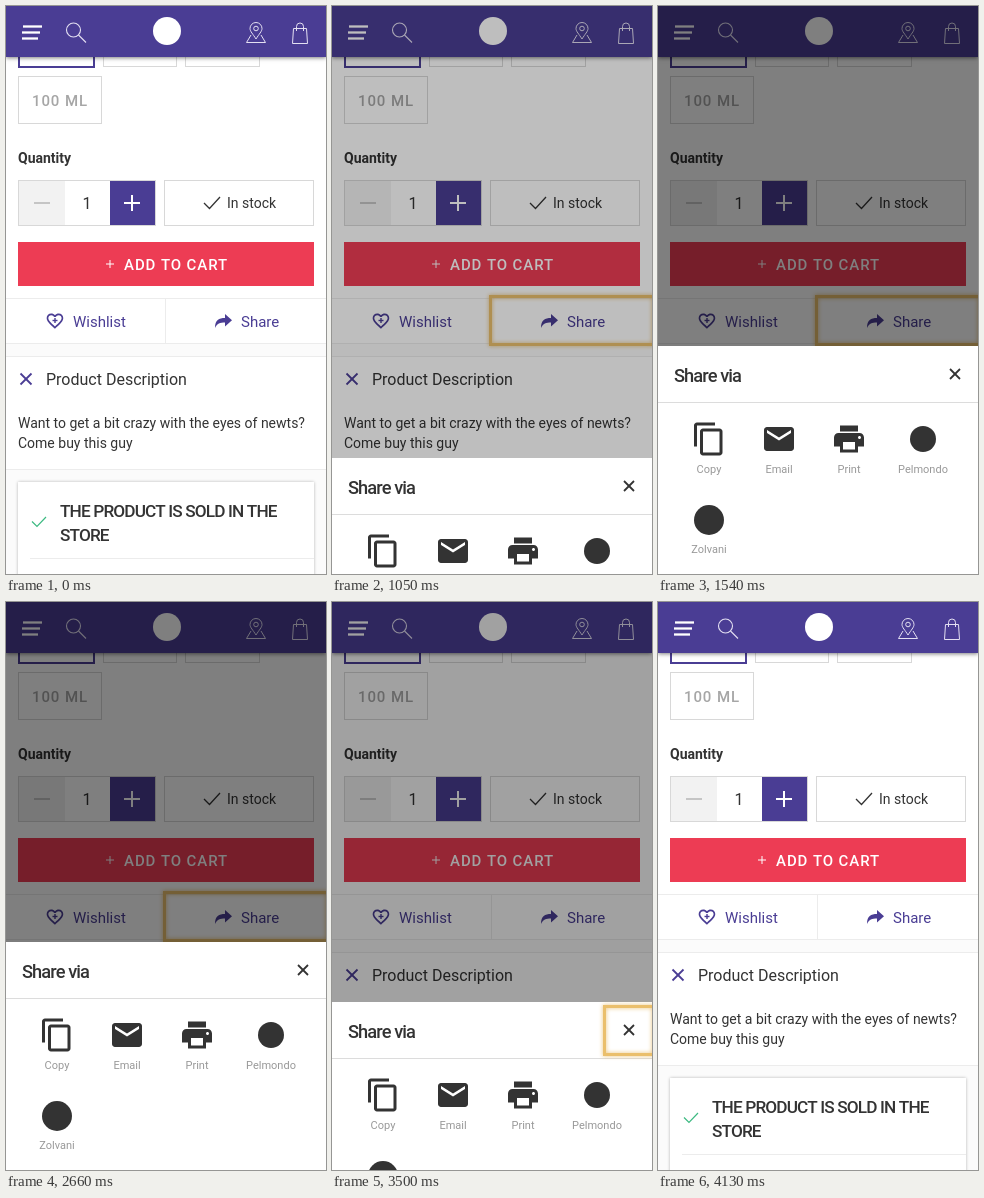
Write an HTML page with a canvas that moves like this. It is 320 by 568 pixels and loops after 4200 ms.

```html
<!DOCTYPE html>
<html lang="en">
<head>
<meta charset="utf-8">
<title>Share sheet</title>
<style>
html, body { margin: 0; width: 100%; height: 100%; overflow: hidden; background: #fff; }
canvas { display: block; width: 320px; height: 568px; }
</style>
</head>
<body>
<canvas id="stage"></canvas>
<script>
const W = 320, H = 568, LOOP = 4200, STEP = 70;
const SHEET_H = 228, SLIDE = 450, OPEN = 963, CLOSE = 3447, SHADE = .5;
const FOCUS_SHARE = 980, FOCUS_CLOSE = 3430;
const PURPLE = '#4a3d94', RED = '#ed3c54', INK = '#333', EDGE = '#d8d8d8', RULE = '#ececec';
const SANS = 'Roboto, "Open Sans", sans-serif';
const HEADING_FONTS = ['Roboto', '"Open Sans"', '"Noto Sans"'];

const canvas = document.getElementById('stage');
const ctx = canvas.getContext('2d');
const dpr = window.devicePixelRatio || 1;
canvas.width = W * dpr;
canvas.height = H * dpr;

const icons = {
  copy: new Path2D('M16 1H4c-1.1 0-2 .9-2 2v14h2V3h12V1zm3 4H8c-1.1 0-2 .9-2 2v14c0 1.1.9 2 2 2h11c1.1 0 2-.9 2-2V7c0-1.1-.9-2-2-2zm0 16H8V7h11v14z'),
  mail: new Path2D('M20 4H4c-1.1 0-2 .9-2 2v12c0 1.1.9 2 2 2h16c1.1 0 2-.9 2-2V6c0-1.1-.9-2-2-2zm0 4l-8 5-8-5V6l8 5 8-5v2z'),
  print: new Path2D('M19 8H5c-1.66 0-3 1.34-3 3v6h4v4h12v-4h4v-6c0-1.66-1.34-3-3-3zm-3 11H8v-5h8v5zm3-7c-.55 0-1-.45-1-1s.45-1 1-1 1 .45 1 1-.45 1-1 1zm-1-9H6v4h12V3z'),
  share: new Path2D('M0 14C0 6 4 4 10 4V0l7 6.300-7 6.300V8.500C5 8.500 2 9.500 0 14z'),
  heart: new Path2D('M16.5 3c-1.74 0-3.41.81-4.5 2.09C10.91 3.81 9.24 3 7.5 3 4.42 3 2 5.42 2 8.5c0 3.78 3.4 6.86 8.55 11.54L12 21.35l1.45-1.32C18.6 15.36 22 12.28 22 8.5 22 5.42 19.58 3 16.5 3zM12 18.650C7.140 14.240 4 11.390 4 8.500 4 6.500 5.500 5 7.500 5c1.540 0 3.040.990 3.570 2.360h1.870C13.460 5.990 14.960 5 16.500 5c2 0 3.500 1.500 3.500 3.500 0 2.890-3.140 5.740-8 10.150z')
};

const clamp = v => Math.max(0, Math.min(1, v));

// cubic-bezier(.36, .66, .04, 1)
function ease(x) {
  if (x <= 0 || x >= 1) return clamp(x);
  const at = (s, a, b) => 3 * (1 - s) * (1 - s) * s * a + 3 * (1 - s) * s * s * b + s * s * s;
  let lo = 0, hi = 1;
  for (let i = 0; i < 30; i++) {
    const mid = (lo + hi) / 2;
    if (at(mid, .36, .04) < x) lo = mid; else hi = mid;
  }
  return at(lo, .66, 1);
}

function rect(x, y, w, h, color) {
  ctx.fillStyle = color;
  ctx.fillRect(x, y, w, h);
}

function box(x, y, w, h, color, line = 1) {
  ctx.strokeStyle = color;
  ctx.lineWidth = line;
  ctx.strokeRect(x + line / 2, y + line / 2, w - line, h - line);
}

function disc(x, y, r, color) {
  ctx.fillStyle = color;
  ctx.beginPath();
  ctx.arc(x, y, r, 0, Math.PI * 2);
  ctx.fill();
}

function ring(x, y, r, color, width) {
  ctx.strokeStyle = color;
  ctx.lineWidth = width;
  ctx.beginPath();
  ctx.arc(x, y, r, 0, Math.PI * 2);
  ctx.stroke();
}

function line(color, width, ...pts) {
  ctx.strokeStyle = color;
  ctx.lineWidth = width;
  ctx.beginPath();
  for (let i = 0; i < pts.length; i += 2) ctx.lineTo(pts[i], pts[i + 1]);
  ctx.stroke();
}

function plus(x, y, r, color, width) {
  line(color, width, x - r, y, x + r, y);
  line(color, width, x, y - r, x, y + r);
}

function cross(x, y, r, color, width) {
  line(color, width, x - r, y - r, x + r, y + r);
  line(color, width, x + r, y - r, x - r, y + r);
}

function icon(path, x, y, scale, color) {
  ctx.save();
  ctx.translate(x, y);
  ctx.scale(scale, scale);
  ctx.fillStyle = color;
  ctx.fill(path, 'evenodd');
  ctx.restore();
}

function text(str, x, y, size, color, { weight = 400, spacing = 0, align = 'left' } = {}) {
  ctx.font = `${weight} ${size}px ${SANS}`;
  ctx.letterSpacing = spacing + 'px';
  ctx.textAlign = align;
  ctx.fillStyle = color;
  ctx.fillText(str, x, y);
}

function headingType(family, size) {
  ctx.font = `500 ${size}px ${family}, sans-serif`;
  ctx.fontStretch = 'extra-condensed';
  ctx.letterSpacing = -.05 * size + 'px';
}

// Headings use the narrowest face at hand, as large as the line allows.
function heading(lines, x, y, room) {
  ctx.save();
  const widths = HEADING_FONTS.map(family => {
    headingType(family, 24);
    return ctx.measureText(lines[0]).width;
  });
  const width = Math.min(...widths);
  headingType(HEADING_FONTS[widths.indexOf(width)], Math.min(24, 24 * room / width));
  ctx.textAlign = 'left';
  ctx.fillStyle = INK;
  lines.forEach((str, i) => ctx.fillText(str, x, y + i * 24));
  ctx.restore();
}

function focusRing(x, y, w, h) {
  ctx.save();
  ctx.shadowColor = 'rgba(232,184,96,.9)';
  ctx.shadowBlur = 4 * dpr;
  box(x, y, w, h, '#eabf6c', 3);
  ctx.restore();
}

function drawHeader() {
  const thin = '#e4e0f2';
  ctx.save();
  ctx.shadowColor = 'rgba(0,0,0,.5)';
  ctx.shadowBlur = 4 * dpr;
  ctx.shadowOffsetY = dpr;
  rect(0, 0, W, 51, PURPLE);
  ctx.restore();

  line('#fff', 2.3, 17, 20.5, 36, 20.5);
  line('#fff', 2.3, 16, 26.5, 34, 26.5);
  line('#fff', 2.3, 16, 32.5, 32, 32.5);

  ring(67.5, 24, 7, thin, 1.1);
  line(thin, 1.1, 72.5, 29, 80, 36.5);

  disc(161, 25, 14, '#fff');

  ctx.lineWidth = 1;
  ctx.beginPath();
  ctx.moveTo(250, 33);
  ctx.bezierCurveTo(247, 28, 244, 25.5, 244, 22.5);
  ctx.arc(250, 22.5, 6, Math.PI, 0);
  ctx.bezierCurveTo(256, 25.5, 253, 28, 250, 33);
  ctx.stroke();
  ring(250, 22.5, 2.3, thin, 1);
  line(thin, 1, 245, 29, 240.5, 36.5, 259.5, 36.5, 255, 29);

  line(thin, 1, 287.5, 22.5, 300.5, 22.5, 301.5, 37.5, 286.5, 37.5, 287.5, 22.5);
  ctx.beginPath();
  ctx.moveTo(290.5, 25);
  ctx.lineTo(290.5, 20.5);
  ctx.arc(294, 20.5, 3.5, Math.PI, 0);
  ctx.lineTo(297.5, 25);
  ctx.stroke();
}

function drawOptions() {
  box(12, 20, 77, 42, PURPLE, 2);
  box(97, 20, 74, 41, EDGE);
  box(179, 20, 75, 41, EDGE);
  box(12, 70, 84, 48, EDGE);
  text('100 ML', 26, 100, 15, '#a6a6a6', { weight: 500, spacing: .9 });

  text('Quantity', 12, 157, 14, INK, { weight: 700 });
  rect(12, 174, 47, 46, '#f2f2f2');
  box(12, 174, 138, 46, EDGE);
  rect(104, 175, 45, 44, PURPLE);
  line('#bdbdbd', 1.7, 28, 197, 44, 197);
  plus(126, 197, 8, '#fff', 2);
  text('1', 81, 203, 16, INK, { align: 'center' });

  box(158, 174, 150, 46, EDGE);
  line(INK, 1.3, 198, 197, 203.5, 202.5, 214, 191);
  text('In stock', 221, 202, 14, INK);

  rect(12, 236, 296, 44, RED);
  plus(104, 258, 4, '#fff', 1);
  text('ADD TO CART', 118, 264, 15, '#fff', { weight: 500, spacing: .9 });
}

function drawActions() {
  rect(0, 292, W, 1, RULE);
  rect(159, 292, 1, 46, RULE);
  icon(icons.heart, 39, 305, .83, PURPLE);
  plus(49, 314.5, 2.5, PURPLE, 1.4);
  text('Wishlist', 67, 321, 15, PURPLE);
  icon(icons.share, 209, 308, 1, PURPLE);
  text('Share', 235, 321, 15, PURPLE);
}

function drawDetails() {
  rect(0, 338, W, 13, '#fbfbfb');
  rect(0, 337, W, 1, RULE);
  rect(0, 350, W, 1, RULE);
  cross(20, 373, 5.5, PURPLE, 1.8);
  text('Product Description', 40, 379, 16, INK);
  text('Want to get a bit crazy with the eyes of newts?', 12, 422, 14, INK);
  text('Come buy this guy', 12, 442, 14, INK);

  rect(0, 463, W, 105, '#fbfbfb');
  rect(0, 463, W, 1, RULE);
  ctx.save();
  ctx.shadowColor = 'rgba(0,0,0,.28)';
  ctx.shadowBlur = 3 * dpr;
  rect(12, 476, 296, 110, '#fff');
  ctx.restore();
  line('#3dba82', 1.2, 26, 515.5, 31, 520.5, 40, 511);
  heading(['THE PRODUCT IS SOLD IN THE', 'STORE'], 54, 511, 217);
  rect(24, 552, 284, 1, RULE);
}

function drawSheet(top, focused) {
  rect(0, top, W, SHEET_H + 1, '#fff');
  heading(['Share via'], 16, top + 36, 67);
  cross(297, top + 28, 5, INK, 1.8);
  rect(0, top + 56, W, 1, '#dcdcdc');

  icon(icons.copy, 33, top + 75, 1.5, INK);
  icon(icons.mail, 103, top + 75, 1.5, INK);
  icon(icons.print, 173, top + 75, 1.5, INK);
  disc(265, top + 93, 13, INK);
  disc(51, top + 174, 15, INK);

  const label = (str, x, y) => text(str, x, top + y, 11, '#999', { align: 'center' });
  label('Copy', 51, 127);
  label('Email', 121, 127);
  label('Print', 191, 127);
  label('Pelmondo', 265, 127);
  label('Zolvani', 51, 207);

  if (focused) focusRing(271, top + 3, 52, 51);
}

function draw(t) {
  const shown = ease((t - OPEN) / SLIDE) - ease((t - CLOSE) / SLIDE);
  ctx.setTransform(dpr, 0, 0, dpr, 0, 0);
  rect(0, 0, W, H, '#fff');
  drawOptions();
  drawActions();
  drawDetails();
  if (t >= FOCUS_SHARE && t < FOCUS_CLOSE) focusRing(157, 289, 166, 51);
  drawHeader();
  if (shown > .002) {
    rect(0, 0, W, H, `rgba(0,0,0,${SHADE * shown})`);
    drawSheet(Math.round(H - SHEET_H * shown), t >= FOCUS_CLOSE);
  }
}

const start = performance.now();
function tick() {
  const t = (performance.now() - start) % LOOP;
  draw(Math.floor(t / STEP) * STEP);
  requestAnimationFrame(tick);
}
tick();
</script>
</body>
</html>
```
